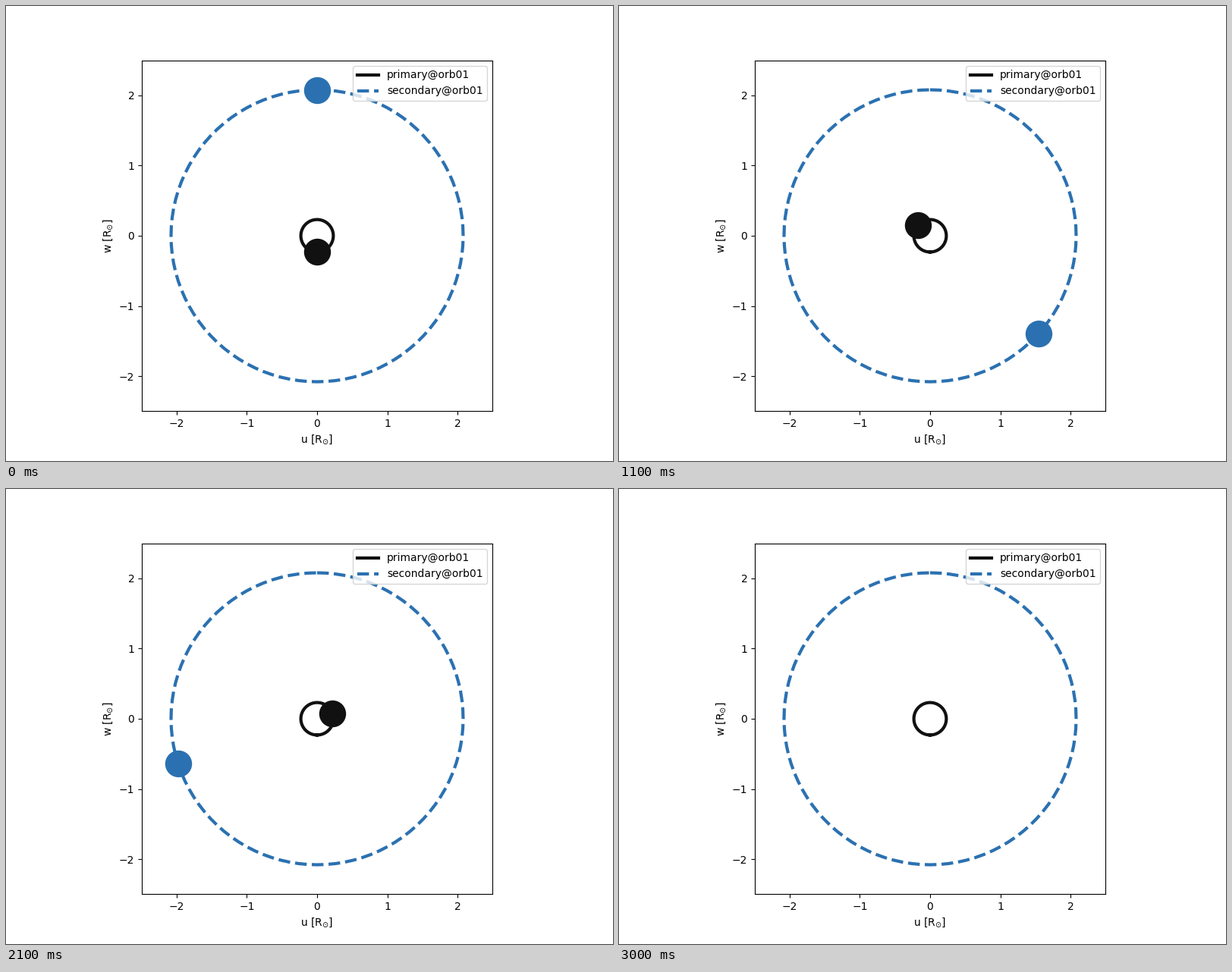
A matplotlib script for the animation above (3100 ms loop, 800 by 600 pixels).

```python
import numpy as np
import matplotlib.pyplot as plt
from matplotlib.animation import FuncAnimation

FRAMES = 31
STEPS_PER_TURN = 30
SEPARATION = 2.31
MASS_FRACTION = 0.1
BLACK, BLUE = "#111111", "#2B71B1"

R_PRIMARY = SEPARATION * MASS_FRACTION
R_SECONDARY = SEPARATION * (1 - MASS_FRACTION)
LIMIT = 1.2 * R_SECONDARY


def position(radius, phase):
    """Clockwise circular orbit, starting at the top."""
    angle = 2 * np.pi * phase
    return radius * np.sin(angle), radius * np.cos(angle)


fig, ax = plt.subplots(figsize=(8, 6), dpi=100)
ax.set_aspect("equal")
ax.set_xlim(-LIMIT, LIMIT)
ax.set_ylim(-LIMIT, LIMIT)
ax.set_xticks(range(-2, 3))
ax.set_yticks(range(-2, 3))
ax.set_xlabel(r"u [$\mathrm{R_{\odot}}$]")
ax.set_ylabel(r"w [$\mathrm{R_{\odot}}$]")

# A negative radius puts the primary opposite its companion.
orbits = [
    (-R_PRIMARY, BLACK, "-", "primary@orb01"),
    (R_SECONDARY, BLUE, "--", "secondary@orb01"),
]
phases = np.linspace(0, 1, 101)
stars = []
for radius, color, style, label in orbits:
    ax.plot(*position(radius, phases), style, color=color, lw=3, label=label)
    star, = ax.plot([], [], "o", color=color, ms=25.5, mew=0, zorder=2.5)
    stars.append(star)
ax.legend(loc="upper right")


def update(i):
    # The stars vanish once the turn is complete.
    visible = i < STEPS_PER_TURN
    for star, (radius, *_) in zip(stars, orbits):
        x, y = position(radius, i / STEPS_PER_TURN)
        star.set_data([x], [y])
        star.set_visible(visible)
    return stars


anim = FuncAnimation(fig, update, frames=FRAMES, interval=100,
                     repeat=True, repeat_delay=0)
plt.show()
```
